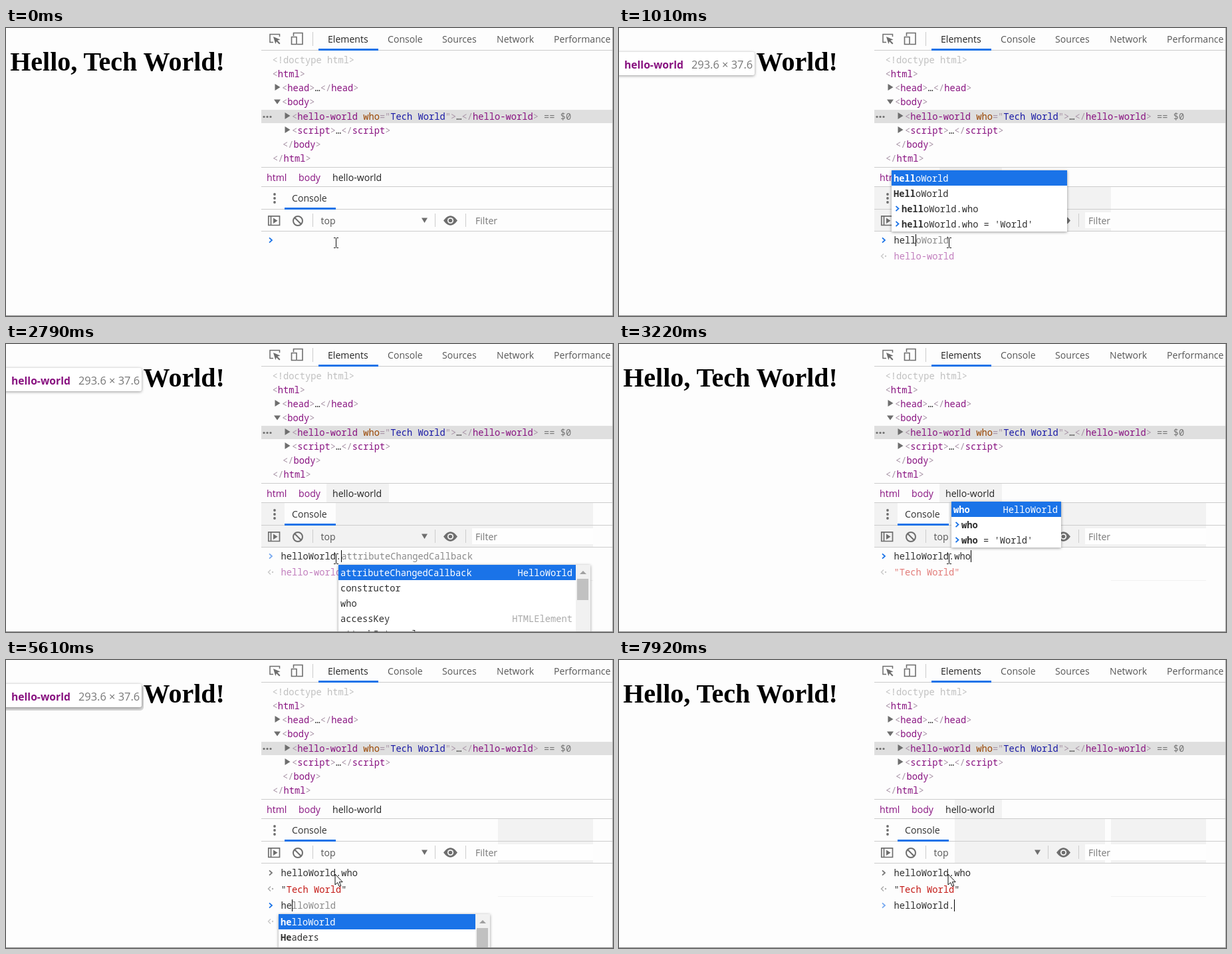
Recreate the animation shown at these times as an HTML page. Size 913 by 433 pixels, loop 8000 ms.

```html
<!DOCTYPE html>
<html lang="en">
<head>
<meta charset="utf-8">
<title>Console demo</title>
<style>
html, body { margin: 0; width: 100%; height: 100%; overflow: hidden; background: #fdfdfd; }
svg { display: block; }
text { white-space: pre; }
.mono { font: 13.745px "Noto Sans Mono", "DejaVu Sans Mono", monospace; }
.ui { font: 14.1px "Open Sans", "Noto Sans", sans-serif; }
.title { font: bold 40px "Liberation Serif", serif; }
.shadow { filter: drop-shadow(0 1px 2px #0006); }
</style>
</head>
<body>
<svg id="stage" width="913" height="433" viewBox="0 0 913 433"></svg>
<script>
const LOOP = 8000, CHAR = 8.247, TEXT_X = 413.5;
const BLUE = '#1a73e8', PURPLE = '#881280', PUNCT = '#a894a6', DARK = '#303030', ICON = '#6e6e6e', LINE = '#ccc';

// time, typed text, caret, popup, preview, tooltip
const steps = [
  [0, '', 0], [430, '', 1],
  [710, 'h', 1],
  [860, 'he', 1, 'list', 'element', 1],
  [1010, 'hell', 1, 'hello', 'element', 1],
  [1140, 'hello', 1, 'hello', 'element', 1],
  [1450, 'helloW', 1, 'hello', 'element', 1],
  [1750, 'helloWo', 1, 'hello', 'element', 1],
  [1890, 'helloWor', 1, 'hello', 'element', 1],
  [2030, 'helloWorl', 1, 'hello', 'element', 1],
  [2180, 'helloWorld', 1, 'hello', 'element', 1],
  [2640, 'helloWorld.', 1],
  [2790, 'helloWorld.', 1, 'members', 'element', 1],
  [2940, 'helloWorld.w', 1, 'who', 'string'],
  [3080, 'helloWorld.wh', 1, 'who', 'string'],
  [3220, 'helloWorld.who', 1, 'who', 'string'],
  [3800, 'helloWorld.who', 0, 'who', 'string'],
  [4080, 'helloWorld.who', 1, '', 'string'],
  [4250, '', 0], [4490, '', 1], [5030, '', 0],
  [5330, 'h', 1],
  [5480, 'h', 1, 'list', 'element', 1],
  [5610, 'he', 1, 'list', 'element', 1],
  [5760, 'hel', 1, 'hello', 'element', 1],
  [5890, 'hell', 1, 'hello', 'element', 1],
  [6470, 'hell', 0, 'hello', 'element', 1],
  [6900, 'hell', 1, 'hello', 'element', 1],
  [7050, 'helloWorld', 1, '', 'element', 1],
  [7480, 'helloWorld', 0, '', 'element', 1],
  [7920, 'helloWorld.', 1]
];

// grey toolbar spans: start time, then [left, right] pairs
const shades = [
  [0], [1010, [384, 740]], [2640, [384, 883]], [5330, [740, 883]],
  [5890, [402, 731], [740, 883]], [7920, [505, 731], [740, 883]]
];

// rows: [text, note]; a leading ">" marks a history entry
const popups = {
  list: { x: 410, y: 332, w: 318, scroll: 1, rows: [['helloWorld'], ['Headers'], ['HelloWorld']] },
  hello: { x: 410, y: 214, w: 264, rows: [['helloWorld'], ['HelloWorld'], ['>helloWorld.who'], ['>helloWorld.who = \'World\'']] },
  members: { x: 500, y: 332, w: 379, scroll: 1, rows: [['attributeChangedCallback', 'HelloWorld'], ['constructor'], ['who'], ['accessKey', 'HTMLElement'], ['attachInternals']] },
  who: { x: 500, y: 237, w: 165, rows: [['who', 'HelloWorld'], ['>who'], ['>who = \'World\'']] }
};

const esc = s => s.replace(/&/g, '&amp;').replace(/</g, '&lt;');
const rect = (x, y, w, h, fill, more = '') => `<rect x="${x}" y="${y}" width="${w}" height="${h}" fill="${fill}" ${more}/>`;
const dot = (x, y, r, fill = ICON) => `<circle cx="${x}" cy="${y}" r="${r}" fill="${fill}"/>`;
const fillPath = (d, fill = ICON, more = '') => `<path d="${d}" fill="${fill}" ${more}/>`;
const stroke = (d, color = ICON, w = 1.7) => `<path d="${d}" fill="none" stroke="${color}" stroke-width="${w}"/>`;
const text = (cls, x, y, fill, s, more = '') => `<text class="${cls}" x="${x}" y="${y}" fill="${fill}" ${more}>${esc(s)}</text>`;
const mono = (...a) => text('mono', ...a);
const ui = (...a) => text('ui', ...a);
const runs = (x, y, list) => `<text class="mono" x="${x}" y="${y}">` +
  list.map(([fill, s, weight = 400]) => `<tspan fill="${fill}" font-weight="${weight}">${esc(s)}</tspan>`).join('') + '</text>';
const chevron = (x, y, color) => stroke(`M${x} ${y - 3.7}l4 3.7l-4 3.7`, color, 1.8);
const markup = s => s.split(/(<\/?|>|…)/).filter(Boolean)
  .map(p => [p === '…' ? DARK : /[<>]/.test(p) ? PUNCT : PURPLE, p]);
const lastAt = (list, t) => list.filter(s => s[0] <= t).pop();

function shading(t) {
  return lastAt(shades, t).slice(1).map(([a, b]) => {
    const clip = (l, r, y, h, fill) => rect(Math.max(a, l), y, Math.max(0, Math.min(b, r) - Math.max(a, l)), h, fill);
    return rect(a, 239, b - a, 66, '#f2f2f2') + clip(482, 576, 210, 28, '#f2f2f2') +
      clip(419, 496, 239, 33, '#fdfdfd') + clip(701, 883, 277, 24, '#fefefe') +
      (t >= 2640 && b === 883 ? rect(740, 355, 143, 1, '#f1f1f1') : '');
  }).join('');
}

function topBar() {
  const tabs = [[484, 'Elements', '#222'], [574, 'Console'], [656, 'Sources'], [738, 'Network'], [824, 'Performance']];
  return stroke('M402 21.5H397V9.5H411.5V13', ICON, 1.5) +
    fillPath('M402 13L412.5 17.5L408.3 18.8L412.5 23L411 24.5L406.8 20.3L405.3 24Z') +
    stroke('M432.5 12V7.5H446V24.5H438', ICON, 1.6) + stroke('M429.5 13.5H437V24.5H429.5Z', ICON, 1.6) +
    rect(461, 6, 1, 21, LINE) +
    tabs.map(([x, s, c = '#555']) => ui(x, 22, c, s)).join('') +
    rect(384, 33, 529, 1, LINE) + rect(470, 31, 90, 3, BLUE);
}

function elements() {
  const right = (x, y) => fillPath(`M${x} ${y - 5}l8 5l-8 5z`);
  return rect(384, 123, 528, 20, '#dfdfdf') +
    mono(400.5, 53, '#c0c0c0', '<!doctype html>', 'font-weight="600"') +
    runs(400.5, 74, markup('<html>')) +
    right(404.5, 89) + runs(415, 95, markup('<head>…</head>')) +
    fillPath('M403 107.5h10l-5 7z') + runs(415, 116, markup('<body>')) +
    dot(388, 133.5, 1.6) + dot(393, 133.5, 1.6) + dot(398, 133.5, 1.6) +
    right(419.5, 132) + runs(430, 138, [
      ...markup('<hello-world'), ['#994500', ' who'], [PUNCT, '="'], ['#1a1aa6', 'Tech World'], [PUNCT, '"'],
      ...markup('>…</hello-world>')]) +
    mono(809, 138, '#777', '== $0', 'font-style="italic"') +
    right(419.5, 153) + runs(430, 159, markup('<script>…<\/script>')) +
    runs(416, 180, markup('</body>')) + runs(401, 201, markup('</html>'));
}

function consoleBars() {
  return [209, 238, 272, 305].map(y => rect(384, y, 529, 1, LINE)).join('') +
    ui(392, 230, PURPLE, 'html') + ui(440, 230, PURPLE, 'body') + ui(491, 230, '#222', 'hello-world') +
    [250, 256, 262].map(y => dot(404, y, 1.9)).join('') +
    ui(430, 261, DARK, 'Console') + rect(419, 270, 77, 3, BLUE) +
    stroke('M394.8 282.8H411.5V296.5H394.8ZM398.5 283V296') + fillPath('M402 285.5l6.5 4.2l-6.5 4.2z') +
    stroke('M432 290a7 7 0 1 0 14 0a7 7 0 1 0 -14 0M434 285l10 10', ICON, 2) +
    [461, 645, 691].map(x => rect(x, 279, 1, 20, LINE)).join('') +
    ui(473.5, 295, '#555', 'top') + fillPath('M625 285.5h9l-4.5 7.5z') +
    fillPath('M658 289.5Q668.5 275 679 289.5Q668.5 304 658 289.5Z') + dot(668.5, 289.5, 4.6, '#f6f6f6') + dot(668.5, 289.5, 2.8) +
    ui(706, 295, '#777', 'Filter');
}

const backArrow = (y, color) => stroke(`M398 ${y - 3.5}l-3.5 3.5l3.5 3.5`, color, 1.4) + dot(401, y, 1.2, color);

function prompt(typed, caret, ghost, preview, dy) {
  const y = 324 + dy, dim = typed.endsWith('.');
  let out = chevron(396, y - 5, dim ? '#78a9f0' : BLUE) + runs(TEXT_X, y, [[DARK, typed], ['#8a8a8a', ghost]]);
  if (caret) out += rect(Math.round(TEXT_X + typed.length * CHAR), 310 + dy, 1, 18, '#000');
  if (preview) out += backArrow(343 + dy, '#c8c8c8') + (preview === 'element'
    ? mono(TEXT_X, y + 24, '#c27fbe', 'hello-world') : mono(TEXT_X, y + 24, '#e27c79', '"Tech World"'));
  return out;
}

function popup({ x, y, w, rows, scroll }, match, dy) {
  const inner = scroll ? w - 22 : w, h = rows.length * 23;
  let out = `<g transform="translate(0 ${dy})">` + rect(x, y, w, h, '#fff', 'class="shadow"');
  rows.forEach(([label, note], i) => {
    const top = y + i * 23, base = top + 16.5, past = label[0] === '>', name = past ? label.slice(1) : label;
    const color = i ? DARK : '#fff', weight = i ? 400 : 500;
    if (!i) out += rect(x, top, inner, 23, BLUE);
    if (i === 2 && dy && !scroll) out += rect(x, top, inner, 23, '#e8eefb');
    if (past) out += chevron(x + 6.5, top + 11.5, BLUE);
    const n = name.toLowerCase().startsWith(match.toLowerCase()) ? match.length : name === 'Headers' ? 2 : 0;
    out += runs(x + (past ? 15 : 3), base, [[color, name.slice(0, n), 700], [color, name.slice(n), weight]]);
    if (note) out += mono(x + inner - 5, base, i ? '#aaa' : '#fff', note, `text-anchor="end" font-weight="${weight}"`);
  });
  if (scroll) {
    const s = x + inner;
    out += rect(s, y, 22, h, '#f1f1f1') + fillPath(`M${s + 6} ${y + 14}l5 -5l5 5z`, '#a0a0a0') +
      rect(s + 2, y + 21, 17, 32, '#c1c1c1');
  }
  return out + '</g>';
}

function tooltip(late) {
  return (late ? rect(-4, 38, 211, 38, '#dadada', 'rx="5"') : '') +
    rect(-4, 36, 208, 35, '#fff', 'rx="3" class="shadow"') +
    ui(8, 61, PURPLE, 'hello-world', 'style="font-size:15.7px;font-weight:bold"') +
    ui(109, 61, '#777', '293.6 × 37.6', 'style="font-size:16.4px"');
}

function pointer(logged) {
  return logged
    ? fillPath('M495 322v16l3.7 -3.4l2.6 5.8l2.5 -1.1l-2.5 -5.6h4.9z', '#fff', 'stroke="#111" stroke-width="1"')
    : stroke('M493 315.5h2.5l1 1l1 -1h2.5M496.5 316.5V329.5M493 330.5h2.5l1 -1l1 1h2.5', '#111', 1);
}

function draw([t, typed, caret, menu, preview, tip]) {
  const logged = t >= 4250, dy = logged ? 50 : 0;
  const match = typed.split('.').pop();
  const ghost = menu ? popups[menu].rows[0][0].slice(match.length) : '';
  return rect(0, 0, 913, 433, '#fdfdfd') + text('title', 6.2, 64, '#000', 'Hello, Tech World!') +
    (tip ? tooltip(t >= 5330) : '') +
    shading(t) + topBar() + elements() + consoleBars() +
    (logged ? chevron(396, 320, '#777') + mono(TEXT_X, 325, DARK, 'helloWorld.who') + backArrow(344, '#aaa') +
      runs(TEXT_X, 350, [[DARK, '"'], ['#c41a16', 'Tech World'], [DARK, '"']]) : '') +
    prompt(typed, caret, ghost, preview, dy) +
    (menu ? popup(popups[menu], match, dy) : '') +
    pointer(logged) +
    rect(912, 0, 1, 433, '#a8a8a8') + rect(0, 432, 913, 1, '#8f8f8f');
}

const stage = document.getElementById('stage');
let shown;
function tick() {
  const step = lastAt(steps, performance.now() % LOOP);
  if (step !== shown) stage.innerHTML = draw(shown = step);
  requestAnimationFrame(tick);
}
tick();
</script>
</body>
</html>
```
